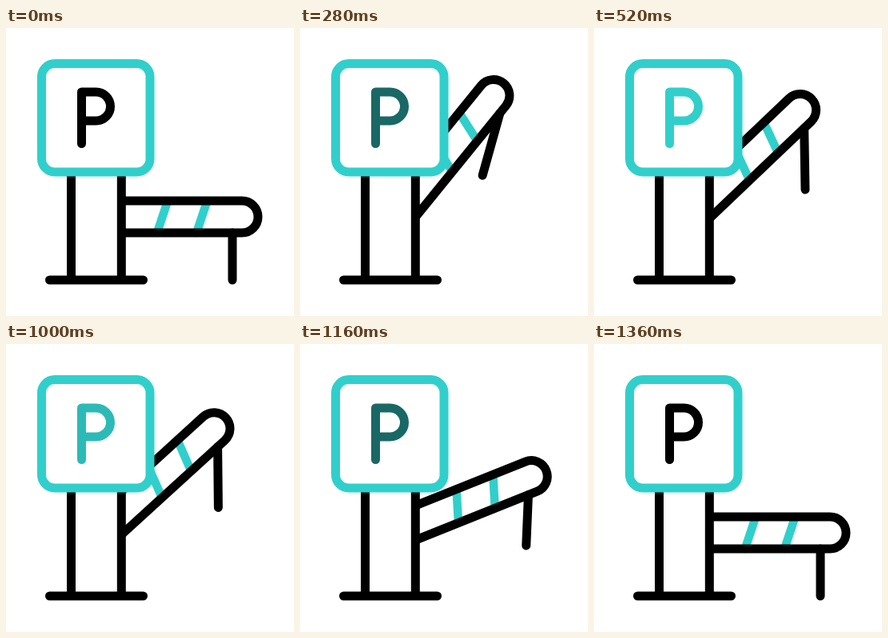
These frames come from a looping animation (360x360 px, 2 s). An HTML page:

```html
<!DOCTYPE html>
<html lang="en">
<head>
<meta charset="utf-8">
<title>Parking barrier</title>
<style>
  html, body { margin: 0; width: 100%; height: 100%; overflow: hidden; background: #fff; }
  svg { display: block; width: 100%; height: 100%; fill: none; stroke: #000; stroke-width: 11; stroke-linecap: round; stroke-linejoin: round; }
  .teal { stroke: #31cfcb; }
</style>
</head>
<body>
<svg viewBox="0 0 360 360">
  <clipPath id="besidePost"><rect x="144" y="0" width="216" height="360"/></clipPath>
  <g clip-path="url(#besidePost)">
    <!-- The arm's origin is its hinge. -->
    <g id="arm">
      <path class="teal" stroke-width="10.5" style="stroke-width:10.5" d="M92.8 0L79.4 40M142.1 0L128.7 40"/>
      <path d="M-60 0H185.6a20 20 0 0 1 0 40H-60"/>
      <path id="leg"/>
    </g>
  </g>
  <path d="M81.5 180V315M144.3 180V315M54.5 315H171.5"/>
  <rect class="teal" x="44.5" y="44.5" width="135.5" height="135.5" rx="16.5" fill="#fff"/>
  <path id="letter" d="M94.5 144.5V80H112.5a18 18 0 0 1 0 36H94.5"/>
</svg>
<script>
  const LOOP = 2000, STEP = 40;
  const TEAL = [49, 207, 203];
  const arm = document.getElementById('arm');
  const leg = document.getElementById('leg');
  const letter = document.getElementById('letter');

  // Poses: arm angle, then the leg tip relative to its joint on the arm.
  const closed = [0, 0, 59], overshoot = [55, -80, 30], open = [43.6, -52, 56.5];
  const poseKeys = [[80, closed], [320, overshoot], [520, open], [960, open], [1360, closed]];
  const tintKeys = [[80, [0]], [480, [1]], [960, [1]], [1360, [0]]];

  const linear = p => p;
  const smooth = p => p * p * (3 - 2 * p);

  function sample(keys, time, ease) {
    const next = keys.findIndex(([at]) => at > time);
    if (next === 0) return keys[0][1];
    if (next < 0) return keys[keys.length - 1][1];
    const [start, from] = keys[next - 1], [end, to] = keys[next];
    const p = ease((time - start) / (end - start));
    return from.map((value, i) => value + (to[i] - value) * p);
  }

  const origin = performance.now();

  function draw() {
    const elapsed = (performance.now() - origin) % LOOP;
    const time = Math.floor(elapsed / STEP) * STEP;
    const [angle, tipX, tipY] = sample(poseKeys, time, smooth);
    const [tint] = sample(tintKeys, time, linear);
    arm.setAttribute('transform', `translate(109.4 216) rotate(${-angle})`);
    leg.setAttribute('d', `M173.6 40l${tipX} ${tipY}`);
    letter.style.stroke = `rgb(${TEAL.map(c => Math.round(c * tint))})`;
    requestAnimationFrame(draw);
  }
  draw();
</script>
</body>
</html>
```
